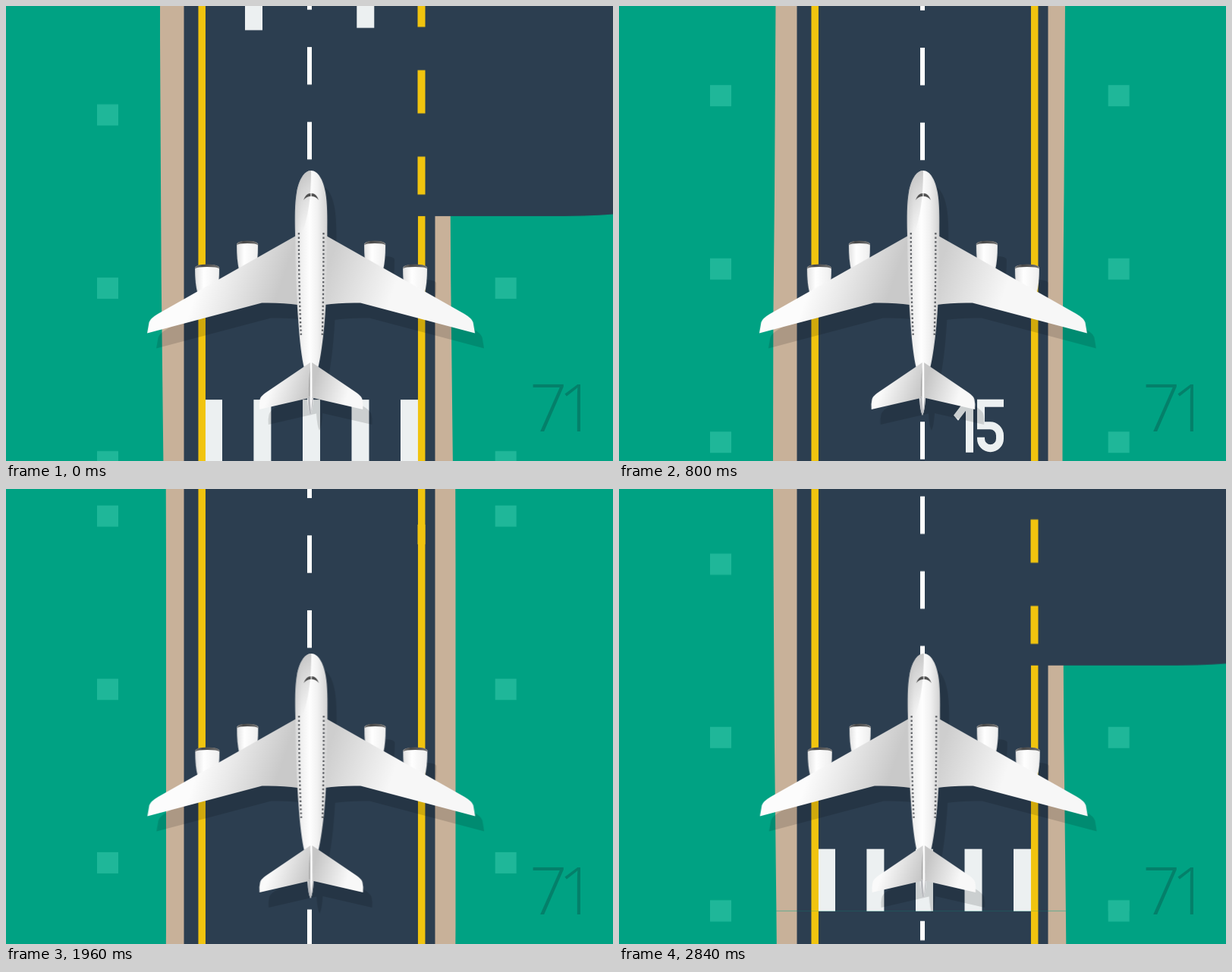
An HTML page for the animation above (2880 ms loop, 800 px wide and 600 px high).

```html
<!DOCTYPE html>
<html lang="en">
<head>
<meta charset="utf-8">
<title>Runway</title>
<style>
  html, body { margin: 0; width: 100%; height: 100%; overflow: hidden; background: #00a283; }
  svg { display: block; width: 800px; height: 600px; }
  #ground { animation: scroll 2880ms linear infinite; }
  #plane { animation: sway 2880ms -2820ms ease-in-out infinite; }
  @keyframes scroll { to { transform: translateY(3200px); } }
  @keyframes sway {
    0%, 100% { transform: translateX(.3px); }
    15.3% { transform: translateX(-3px); }
    36.1% { transform: translateX(.7px); }
    50% { transform: translateX(-1.6px); }
    67.7% { transform: translateX(.4px); }
    89.9% { transform: translateX(-2.1px); }
  }
  .line { fill: none; stroke: #f1c40f; }
  .paint { fill: #ecf0f1; }
  .digit { fill: none; stroke: #ecf0f1; stroke-width: 10; }
  .number { font: 300 87px "Open Sans", sans-serif; fill: #04806a; }
</style>
</head>
<body>
<svg viewBox="0 0 800 600">
  <defs>
    <linearGradient id="bodyShade">
      <stop offset="0" stop-color="#d6d6d6"/>
      <stop offset=".2" stop-color="#f1f1f1"/>
      <stop offset=".45" stop-color="#fff"/>
      <stop offset=".7" stop-color="#f1f1f1"/>
      <stop offset="1" stop-color="#d2d2d2"/>
    </linearGradient>
    <linearGradient id="noseShade" x2="0" y2="1">
      <stop offset="0" stop-color="#aaa" stop-opacity=".65"/>
      <stop offset="1" stop-color="#bbb" stop-opacity="0"/>
    </linearGradient>
    <linearGradient id="leftWing" gradientUnits="userSpaceOnUse" x1="255" y1="365" x2="352" y2="398">
      <stop offset="0" stop-color="#fcfcfc"/>
      <stop offset=".45" stop-color="#e6e6e6"/>
      <stop offset="1" stop-color="#c9c9c9"/>
    </linearGradient>
    <linearGradient id="rightWing" gradientUnits="userSpaceOnUse" x1="423" y1="345" x2="510" y2="375">
      <stop offset="0" stop-color="#cecece"/>
      <stop offset="1" stop-color="#f7f7f7"/>
    </linearGradient>
    <linearGradient id="leftTail" gradientUnits="userSpaceOnUse" x1="348" y1="505" x2="398" y2="522">
      <stop offset="0" stop-color="#fafafa"/>
      <stop offset="1" stop-color="#c4c4c4"/>
    </linearGradient>
    <linearGradient id="rightTail" gradientUnits="userSpaceOnUse" x1="403" y1="505" x2="448" y2="518">
      <stop offset="0" stop-color="#c6c6c6"/>
      <stop offset="1" stop-color="#f8f8f8"/>
    </linearGradient>
    <linearGradient id="engineShade">
      <stop offset="0" stop-color="#e2e2e2"/>
      <stop offset=".35" stop-color="#fff"/>
      <stop offset="1" stop-color="#eee"/>
    </linearGradient>
    <linearGradient id="capShade">
      <stop offset="0" stop-color="#777"/>
      <stop offset=".3" stop-color="#484848"/>
      <stop offset="1" stop-color="#707070"/>
    </linearGradient>

    <path id="body" d="M402 217C411 217 418 229 421 246C423.5 260 423.5 278 423.3 300C423 350 422.500 390 419.500 420C417.500 442 414.500 464 411 478L405 518Q404 534 401 540Q398 534 397 518L393 478C389.500 464 387 442 385.500 420C383 390 381.500 350 381 300C380.500 278 380.500 260 383 246C386 229 393 217 402 217z"/>
    <path id="wing" d="M382 303L200 406Q190 412 188.500 417L186 431.500L337 391.500Q365 391 384 394z"/>
    <path id="tail" d="M401 470L342 510Q335 515 334.500 519Q333 525 333.800 532L401 516.500z"/>
    <path id="pod" d="M0 5Q0 0 16 0Q32 0 32 5Q32 26 28.500 38H3.500Q0 26 0 5z"/>
    <g id="pods">
      <use href="#pod" x="249" y="341"/>
      <use href="#pod" transform="translate(304 310) scale(.875 1)"/>
      <use href="#pod" transform="translate(472 310) scale(.875 1)"/>
      <use href="#pod" x="523" y="341"/>
    </g>
    <path id="cap" fill="url(#capShade)" d="M0 6Q0 0 16 0Q32 0 32 6Q29 3.600 16 3.600Q3 3.600 0 6z"/>
    <path id="five" d="M35 5H5V34.500H17a13 13 0 0 1 13 13V52a12.500 12.500 0 0 1-25 0V50"/>

    <g id="tile">
      <path d="M134-2614.360V600M658.700-2614.360V600" fill="none" stroke="#1fb799" stroke-width="28" stroke-dasharray="28 200.571"/>
      <path fill="#c8b199" d="M207.400-2600L210.600-2244 211-2080V-1600L208-1148 205-644 203.400-480 203-300V44L204.700 356 207.400 600h381.500L586.200 356 584.500 44V-300L584.900-480 586.500-644 589.500-1148 592.500-1600V-2080L592.100-2244 588.900-2600z"/>
      <path d="M207 599.700H235M565 599.700H589" stroke="#00a283" stroke-width=".6" opacity=".5"/>
      <g fill="#2c3e50">
        <path d="M234.500-2600h331V600h-331z"/>
        <path d="M560 276H735Q770 276 800 273.500V-58.300Q770-53.800 730-53.800H560z"/>
        <path d="M240-1478.400H75Q30-1478.400 0-1475.500V-1144.400Q30-1148.400 75-1148.400H240z"/>
      </g>

      <path class="paint" d="M262 518h23v82h-23zm64.400 0h23v82h-23zm64.600 0h23v82h-23zm64.500 0h23v82h-23zm64.500 0h23v82h-23z"/>
      <path class="paint" d="M315-102.300h23v133h-23zm147.300-3h23v133h-23zM315-1137.400h23v133h-23zm147.300-3h23v133h-23z"/>
      <path class="line" stroke-width="9.5" d="M258.200-2600V-1478.400M258.200-1148.400V600M547.700-2600V-53.800M547.700 276V600"/>
      <path class="line" stroke-width="10" d="M258.300-1453v50m0 57v57m0 57v50M547.500-23.300V26.500m0 57v57m0 57v50M547.500-2401v27m0 47v51M547.500-2132v26"/>
      <path d="M400-2587V473.500" stroke="#fff" stroke-width="6" stroke-dasharray="49.5 49.17" stroke-dashoffset="24.100"/>

      <path class="paint" d="M457-371.300h10v70h-10v-55l-10 13-6-7z"/>
      <use class="digit" href="#five" x="472" y="-371.300"/>
      <rect class="digit" x="294" y="-2282.400" width="25" height="60" rx="12.500"/>
      <use class="digit" href="#five" x="329" y="-2287.400"/>
    </g>
  </defs>

  <rect width="800" height="600" fill="#00a283"/>
  <g id="ground">
    <use href="#tile"/>
    <use href="#tile" y="-3200"/>
  </g>

  <text class="number" y="561" x="690 728">71</text>

  <g id="plane">
    <g transform="translate(12 20)" opacity=".14">
      <use href="#pods"/>
      <use href="#body"/>
      <use href="#wing"/>
      <use href="#wing" transform="matrix(-1 0 0 1 804 0)"/>
      <use href="#tail"/>
      <use href="#tail" transform="matrix(-1 0 0 1 804 0)"/>
    </g>

    <use href="#pods" fill="url(#engineShade)"/>
    <use href="#cap" x="249" y="340.500"/>
    <use href="#cap" transform="translate(304 309.500) scale(.875 1)"/>
    <use href="#cap" transform="translate(472 309.500) scale(.875 1)"/>
    <use href="#cap" x="523" y="340.500"/>

    <use href="#wing" fill="url(#leftWing)"/>
    <path fill="url(#rightWing)" d="M422 303L604 406Q614 412 615.500 417L618 431.500L467 391.500Q439 391 420 394z"/>

    <use href="#body" fill="url(#bodyShade)"/>
    <path fill="url(#noseShade)" d="M402 217C393 217 386 229 383 246Q381 260 381 300L390 300Q402 270 402 217z"/>
    <path fill="#505050" d="M392 256Q395 247 401.400 247V251Q396 251 392 256zM412 256Q409 247 402.600 247V251Q408 251 412 256z"/>
    <path fill="none" stroke="#585b60" stroke-width="2.200" stroke-dasharray="2.400 2.900" d="M385.800 299Q386 380 388.800 434M418.400 299Q418.500 380 416.700 434"/>

    <use href="#tail" fill="url(#leftTail)"/>
    <path fill="url(#rightTail)" d="M403 470L462 510Q469 515 469.500 519Q471 525 470.200 532L403 516.500z"/>
    <path fill="#b4b6ba" d="M398 516H404.500Q404 534 401 540Q398 534 398 516z"/>
    <path fill="#8f8f8f" opacity=".65" d="M401 476Q398.500 492 399 514L401 517z"/>
    <path fill="#fff" d="M400.800 470H403.200L403.400 517 402 538 400.600 517z"/>
  </g>
</svg>
</body>
</html>
```
